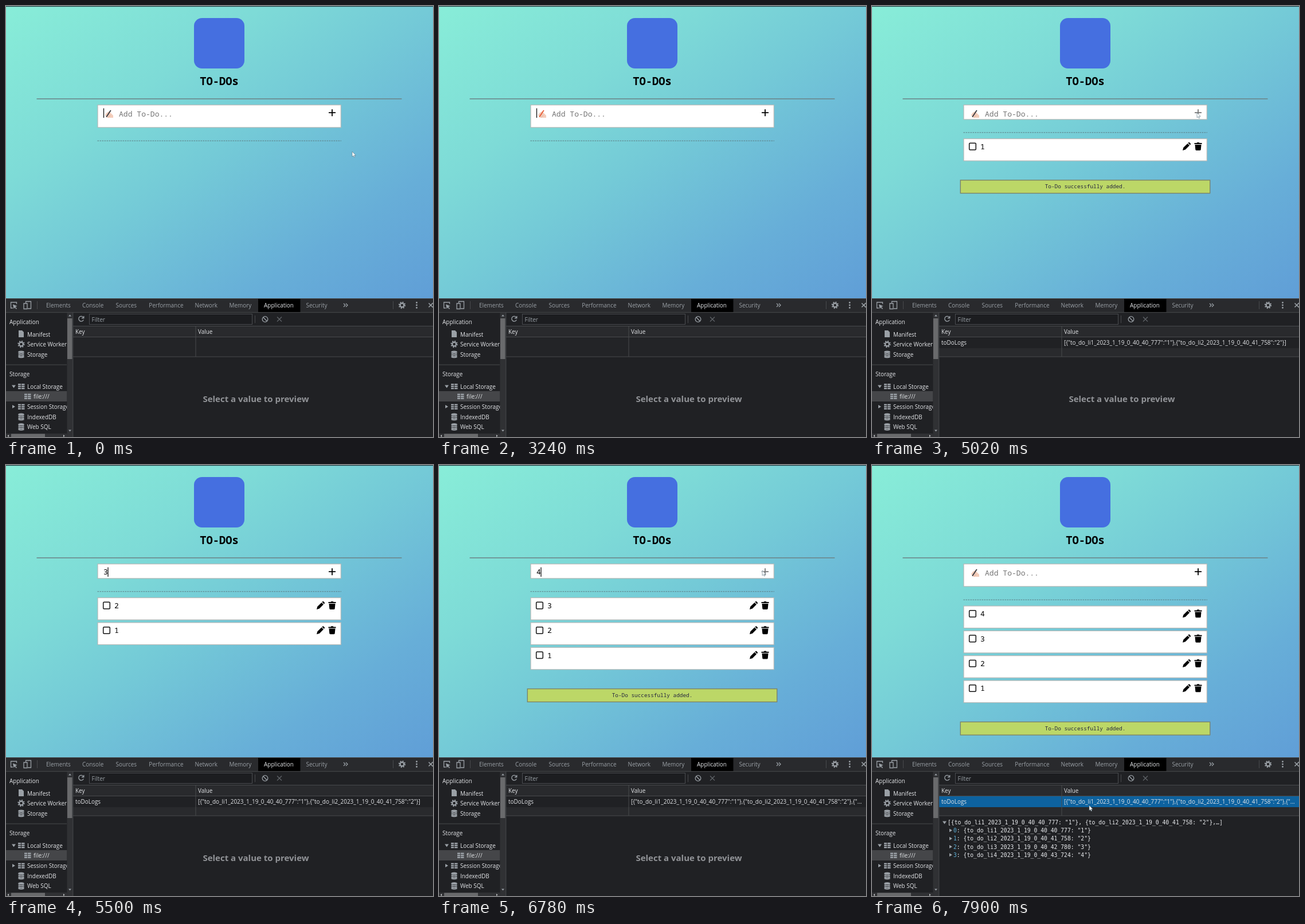
These frames come from a looping animation (745x752 px, 8000 ms). An HTML page:

```html
<!DOCTYPE html>
<html lang="en">
<head>
<meta charset="utf-8">
<title>TO-DOs</title>
<style>
  html, body { margin: 0; width: 100%; height: 100%; overflow: hidden; background: #202124; }
  svg { display: block; width: 745px; height: 752px; }
  text { white-space: pre; }
  .mono { font-family: "Noto Sans Mono", "DejaVu Sans Mono", monospace; }
  .ui { font: 9.95px "Open Sans", "Noto Sans", sans-serif; fill: #e3e5e8; }
  .tab { fill: #9aa0a6; }
  .tree { font: 9.72px "DejaVu Sans Mono", monospace; fill: #e8eaed; }
  .box { fill: #fff; stroke: #b5b8b6; stroke-width: 1.2; }
  .line { stroke: #484a4d; stroke-width: 1; fill: none; }
  .icon { stroke: #9aa0a6; stroke-width: 1.3; fill: none; }
</style>
</head>
<body>
<svg viewBox="0 0 745 752">
  <defs>
    <linearGradient id="sky" x1="0" y1="0" x2="1" y2="1">
      <stop offset="0" stop-color="#88edd8"/>
      <stop offset=".3" stop-color="#7edbd7"/>
      <stop offset=".5" stop-color="#74cad7"/>
      <stop offset=".78" stop-color="#67aed8"/>
      <stop offset="1" stop-color="#609ed7"/>
    </linearGradient>
    <clipPath id="side"><rect y="535" width="106.5" height="211"/></clipPath>
    <path id="pencil" d="M0 14 1.3 9.2 8.6 2 12 5.4 4.8 12.7ZM9.4 1.2 10.5.2Q11.2-.4 11.9.2L13.8 2.1Q14.4 2.8 13.8 3.5L12.8 4.6Z"/>
    <path id="trash" d="M0 1.2H4L5 0H8L9 1.2H13V3.2H0ZM1 4.2H12L11.2 12.6Q11 14 9.8 14H3.2Q2 14 1.8 12.6Z"/>
    <g id="db" fill="none" stroke="#9aa0a6" stroke-width="2">
      <path d="M0 1.5Q5 4 10 1.5M0 4.5Q5 7 10 4.5M0 7.5Q5 10 10 7.5M0 10Q5 12.5 10 10"/>
      <ellipse cx="5" cy="1.5" rx="4" ry="1"/>
    </g>
    <path id="grid" fill="#9aa0a6" d="M0 0H5V2.5H0ZM6 0H11.5V2.5H6ZM0 3.5H5V6H0ZM6 3.5H11.5V6H6ZM0 7H5V9.5H0ZM6 7H11.5V9.5H6Z"/>
    <g id="gear" fill="none" stroke="#9aa0a6">
      <circle r="3.4" stroke-width="2.2"/>
      <circle r="5.2" stroke-width="2" stroke-dasharray="2 2.08"/>
    </g>
    <path id="tri" d="M0-3 5 0 0 3Z" fill="#9aa0a6"/>
  </defs>

  <!-- page -->
  <rect width="745" height="511" fill="url(#sky)"/>
  <rect width="745" height="1.2" fill="#24383d"/>
  <rect x="328" y="21" width="88" height="88" rx="14" fill="#456fe0"/>
  <text class="mono" x="372" y="138" font-size="18.8" font-weight="700" text-anchor="middle">TO-DOs</text>
  <path d="M53.5 162H690.5" stroke="#6b8286" stroke-width="1.4"/>
  <rect id="field" class="box" x="160" y="172.7" width="424.3"/>
  <g id="hint">
    <path d="M173 190 176 186 180 184 183 187 187 191V195H180Q175 196 173 190Z" fill="#f3cdbb"/>
    <path d="M176 191 180 189M178 194 182 191" stroke="#d9a793" stroke-width=".8"/>
    <path id="pen" d="M175.5 193 182.5 182.5" stroke-width="1.9" stroke-linecap="round"/>
    <text class="mono" x="197" y="193" font-size="13.05" fill="#757575">Add To-Do...</text>
  </g>
  <text id="typed" class="mono" x="170" y="191.3" font-size="13"/>
  <path id="caret" d="M0 178.5V195" stroke="#000" stroke-width="1.2"/>
  <path id="plus" d="M563 186.2H575M569 180.2V192.2" stroke-width="1.8"/>
  <g id="lower">
    <path d="M159.5 235.2H585" stroke="#5c7a80" stroke-dasharray="2.6 1.4"/>
    <g id="list"></g>
    <g id="toast">
      <rect x="154.3" y=".7" width="435.4" height="22.8" fill="#bcd767" stroke="#7d8568" stroke-width="1.4"/>
      <text class="mono" x="372" y="15.2" font-size="9.4" text-anchor="middle" fill="#25253f">To-Do successfully added.</text>
    </g>
  </g>
  <g id="dialog">
    <rect x="244" y="-6" width="266" height="59" rx="3" fill="#292b2e" opacity=".9"/>
    <text class="ui" x="254" y="11.3" style="font-size:7.25px">Type something first, try again.</text>
    <rect x="457" y="23.5" width="44" height="20" rx="3" fill="#4f6f9d"/>
    <rect x="458.6" y="25" width="40.8" height="17" rx="2" fill="#8ab4f8"/>
    <text class="ui" x="479" y="36" text-anchor="middle" style="font-size:6.8px;fill:#202124">Tamam</text>
  </g>

  <!-- developer tools -->
  <rect y="510" width="745" height="242" fill="#202124"/>
  <rect y="510" width="745" height="25" fill="#292a2d"/>
  <rect x="440" y="510.5" width="73.5" height="24" fill="#000"/>
  <path class="line" d="M0 510.5H745M0 534.7H745M54.5 515V529M675.5 515V529M117 558.5H745M434.5 540V553M0 626H106"/>
  <g class="icon">
    <path d="M12 527H8.500V517H18.500V520"/>
    <path d="M12 520.500 19.500 523.500 16.500 525 19 528 17.800 529 15.300 526 13.500 528.500Z" fill="#9aa0a6" stroke="none"/>
    <path d="M34.500 518V515.500H43.500V528H38M31 519H37V528.500H31Z"/>
    <path d="M589 519 592 522 589 525M593 519 596 522 593 525"/>
    <path d="M737.500 518.500 745 526M745 518 737.500 525.500" stroke-width="1.6"/>
    <path d="M135 543.500A4.400 4.400 0 1 0 135.300 547.500M135.800 541V544.500H132"/>
    <circle cx="452" cy="546.500" r="4.800"/><path d="M448.600 543 455.400 550"/>
    <path d="M473 542.500 481 550.500M481 542.500 473 550.500" stroke="#5f6367"/>
  </g>
  <use href="#gear" x="691" y="522"/>
  <g fill="#9aa0a6"><circle cx="716.500" cy="517.500" r="1.400"/><circle cx="716.500" cy="522" r="1.400"/><circle cx="716.500" cy="526.500" r="1.400"/></g>
  <g id="tabs"></g>

  <g clip-path="url(#side)">
    <rect y="672" width="107" height="18" fill="#454649"/>
    <path d="M22 566H28L31 569V578H22Z" fill="#9aa0a6"/>
    <use href="#gear" x="26.500" y="590"/>
    <use href="#db" x="21.500" y="602"/><use href="#db" x="21.500" y="711"/><use href="#db" x="21.500" y="728.500"/>
    <use href="#grid" x="21" y="659"/><use href="#grid" x="32" y="676.500"/><use href="#grid" x="21" y="694.500"/>
    <path d="M10 661.500H17L13.500 666.500Z" fill="#9aa0a6"/>
    <use href="#tri" x="11" y="699"/>
    <g id="menu"></g>
  </g>
  <rect x="106.500" y="535" width="10" height="217" fill="#303134"/>
  <rect x="107" y="545" width="8.500" height="71" fill="#696a6c"/>
  <path d="M109 541.500H114L111.500 538.500ZM109 739.500H114L111.500 742.500Z" fill="#9aa0a6"/>
  <rect y="746" width="106.500" height="6" fill="#303134"/>
  <rect x="9" y="746.500" width="59" height="6" fill="#696a6c"/>
  <path d="M5 748V752L2.500 750ZM100 748V752L102.500 750Z" fill="#c4c6c8"/>

  <rect x="145.500" y="537.500" width="284" height="18" fill="#1c1d20" stroke="#4a4c50"/>
  <text class="ui tab" x="149.500" y="550.500">Filter</text>
  <rect x="117" y="559" width="628" height="18" fill="#292a2d"/>
  <rect x="117" y="578" width="628" height="34" fill="#232427"/>
  <text class="ui" x="121" y="572">Key</text>
  <text class="ui" x="335" y="572">Value</text>
  <g id="record">
    <rect x="117" y="597" width="628" height="15" fill="#292a2d"/>
    <rect id="row" x="117" y="578" width="628" height="19"/>
    <text class="ui" x="121" y="591">toDoLogs</text>
    <text id="value" class="ui" x="335" y="591"/>
  </g>
  <path class="line" d="M117 577.500H745M117 612H745M331 559V612M116.800 535V752"/>
  <text id="empty" x="436" y="690.500" text-anchor="middle" font-family="Open Sans, Noto Sans, sans-serif" font-weight="700" font-size="15" fill="#919397">Select a value to preview</text>
  <g id="preview"></g>
  <path id="arrow" d="M0 0V8.800L2 7 3.300 10 4.700 9.400 3.500 6.500H6.200Z" fill="#fff" stroke="#56707c" stroke-width=".6"/>
</svg>

<script>
const LOOP = 8000, PITCH = 43.35;
const $ = id => document.getElementById(id);
const set = (id, name, value) => $(id).setAttribute(name, value);
const show = (id, on) => set(id, "visibility", on ? "visible" : "hidden");
const move = (id, x, y) => set(id, "transform", `translate(${x} ${y})`);
const label = (cls, x, y, s) => `<text class="${cls}" x="${x}" y="${y}">${s}</text>`;
const at = (steps, t) => steps.findLast(s => s[0] <= t);

// time, typed text, tall field, listed items, stored items, toast
const views = [
  [0, "", 1, 0, 0, 0],
  [3570, "1", 0, 0, 0, 0],
  [4050, "", 0, 0, 1, 0],
  [4210, "", 1, 1, 1, 1],
  [4700, "2", 0, 1, 1, 1],
  [5020, "", 0, 1, 2, 1],
  [5180, "", 1, 2, 2, 0],
  [5500, "3", 0, 2, 2, 0],
  [5980, "", 0, 2, 3, 0],
  [6140, "", 1, 3, 3, 1],
  [6620, "4", 0, 3, 3, 1],
  [6940, "", 0, 3, 4, 1],
  [7100, "", 1, 4, 4, 1]
];
const carets = [[0, 1], [320, 0], [810, 1], [1300, 0], [3240, 1], [3570, 0]];
const fades = [[0, 0], [1960, 1], [2920, .5], [3080, 0]];
const pointer = [
  [0, 604, 254], [160, 595, 232], [320, 572, 188], [650, 570, 186], [810, 569, 184],
  [1800, 574, 186], [1960, 571, 183], [2120, 569, 182], [2920],
  [3890, 567, 186], [4700], [4860, 567, 186], [5500], [5660, 566, 185],
  [6620], [6780, 564, 184], [7100, 567, 186], [7260, 545, 260],
  [7420, 470, 420], [7580, 398, 565], [7740, 379, 594]
];
const SELECT = 7740;

const keys = ["40_777", "41_758", "42_780", "43_724"]
  .map((s, i) => `to_do_li${i + 1}_2023_1_19_0_40_${s}`);
const pair = i => `{${keys[i]}: "${i + 1}"}`;
const json = n => {
  const parts = keys.slice(0, Math.min(n, 2)).map((k, i) => `{"${k}":"${i + 1}"}`);
  return "[" + parts.join(",") + (n > 2 ? ',{"...' : "]");
};

$("tabs").innerHTML = [
  [70, "Elements"], [133, "Console"], [191.5, "Sources"], [249.3, "Performance"],
  [329.5, "Network"], [389.5, "Memory"], [450, "Application"], [523.5, "Security"]
].map(([x, s]) => label(s === "Application" ? "ui" : "ui tab", x, 526, s)).join("");

$("menu").innerHTML = [
  [6, 555, "Application"], [37, 576.5, "Manifest"], [37, 594, "Service Workers"],
  [37, 611.5, "Storage"], [6, 646, "Storage"], [37, 667.5, "Local Storage"],
  [48, 685, "file:///"], [37, 702.5, "Session Storage"], [37, 720.5, "IndexedDB"], [37, 738, "Web SQL"]
].map(([x, y, s]) => label("ui", x, y, s)).join("");

$("list").innerHTML = keys.map((_, i) => `<g id="item${i}">
  <rect class="box" x="160" y="246" width="424.3" height="38.500"/>
  <rect x="169.700" y="253.700" width="11.600" height="11.600" rx="1.500" fill="none" stroke="#111" stroke-width="1.500"/>
  <text class="mono" x="189" y="264.300" font-size="13">${i + 1}</text>
  <use href="#pencil" x="542" y="252.300"/><use href="#trash" x="562.500" y="252.300"/></g>`).join("");

$("preview").innerHTML =
  `<path d="M123 621.500H130L126.500 626.500Z" fill="#9aa0a6"/>` +
  label("tree", 132, 627, `[${pair(0)}, ${pair(1)},…]`) +
  keys.map((_, i) => {
    const y = 641 + i * 14.25;
    return `<use href="#tri" x="135" y="${y - 3.5}"/>` +
      label("tree", 142, y, `<tspan fill="#5db0d7">${i}</tspan>: ${pair(i)}`);
  }).join("");

function draw(t) {
  const [, text, tall, count, stored, toast] = at(views, t);
  set("field", "height", tall ? 39.2 : 25.2);
  show("hint", !text);
  set("pen", "stroke", t >= 1800 && t < 3570 ? "#e8603c" : "#3d3f45");
  $("typed").textContent = text;
  show("caret", text || at(carets, t)[1]);
  move("caret", text ? 178 : 170.5, 0);

  move("lower", 0, tall ? 0 : -14.4);
  keys.forEach((_, i) => {
    show("item" + i, i < count);
    move("item" + i, 0, (count - 1 - i) * PITCH);
  });
  show("toast", toast);
  move("toast", 0, 274.2 + count * PITCH);
  set("dialog", "opacity", at(fades, t)[1]);

  const selected = t >= SELECT;
  show("record", stored);
  set("row", "fill", selected ? "#0d629f" : "#202124");
  $("value").textContent = json(stored);
  show("empty", !selected);
  show("preview", selected);

  const [, x, y] = at(pointer, t);
  show("arrow", x);
  if (x) move("arrow", x, y);
  set("plus", "stroke", x > 560 && x < 577 && y < 195 ? "#777" : "#000");
}

let start;
function tick(now) {
  start ??= now;
  draw((now - start) % LOOP);
  requestAnimationFrame(tick);
}
draw(0);
requestAnimationFrame(tick);
</script>
</body>
</html>
```
